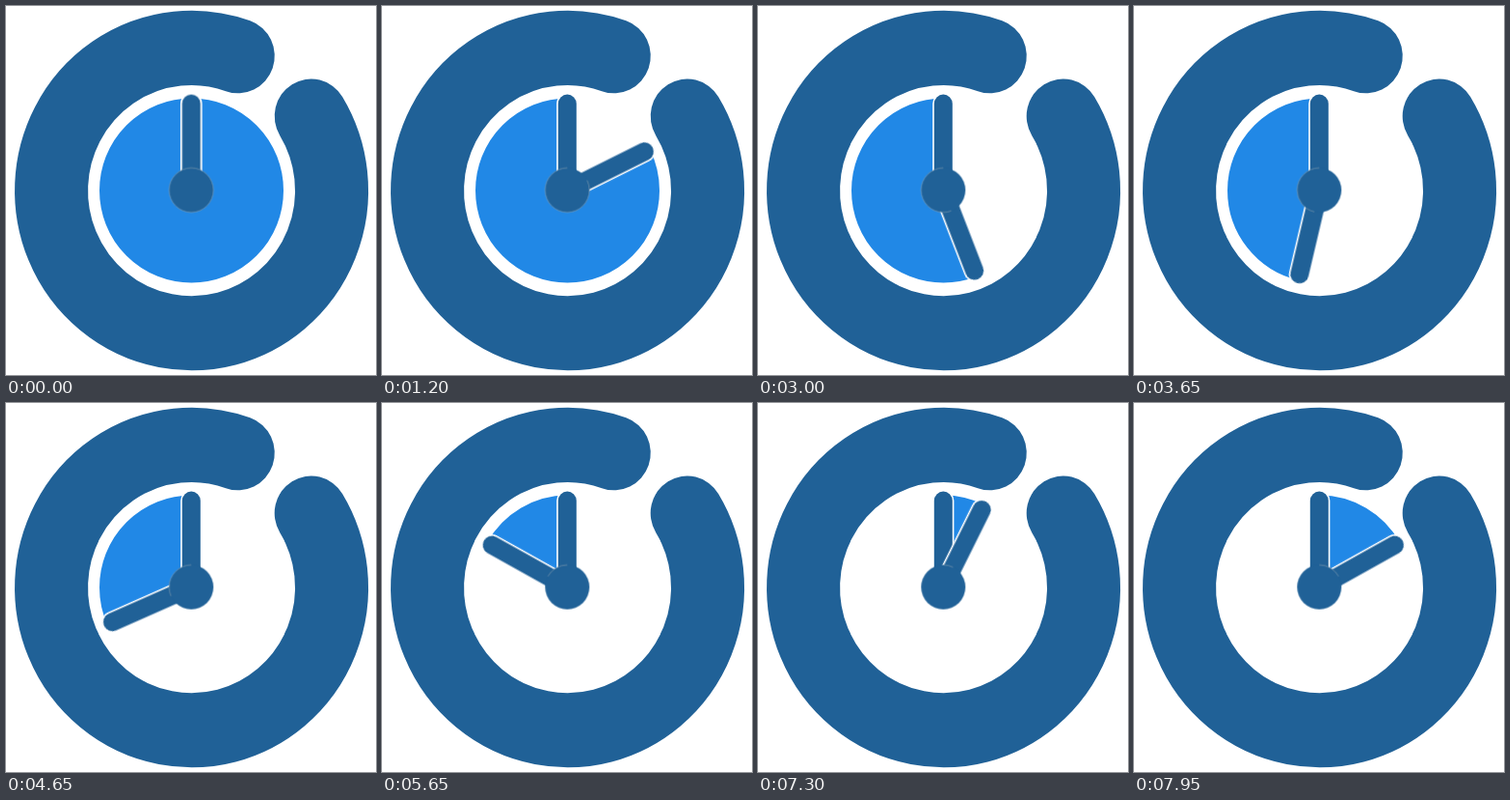
An HTML page without scripts for the animation above (8 s loop, 384 px wide and 382 px high).

```html
<!DOCTYPE html>
<html lang="en">
<head>
<meta charset="utf-8">
<title>Timer</title>
<style>
  html, body { margin: 0; width: 100%; height: 100%; overflow: hidden; background: #fff; }
  svg { display: block; width: 100%; height: 100%; }

  .ring { fill: none; stroke: #206197; stroke-width: 76; stroke-linecap: round; }
  .hand { fill: #206197; stroke: #fff; stroke-width: 3.2; paint-order: stroke; }
  .hub { fill: #206197; }
  .sector, .rim { fill: none; stroke-dasharray: 360 360; }
  .sector { stroke: #2188e6; stroke-width: 95.5; }
  .rim { stroke: #8fa3b3; stroke-width: .8; opacity: .7; }

  /* One turn takes 6.8 s, so 8 s covers 423.53 degrees in 50 ms ticks. */
  .turn, .sector, .rim { animation: 8s steps(160) -8ms infinite; }
  .turn { animation-name: turn; }
  .sector, .rim { animation-name: sweep; }
  @keyframes turn { to { transform: rotate(423.53deg); } }
  /* The dash empties over the first turn, then fills again. */
  @keyframes sweep { from { stroke-dashoffset: 0; } to { stroke-dashoffset: -423.53; } }
</style>
</head>
<body>
<svg viewBox="0 0 384 382">
  <defs>
    <rect id="hand" x="-9.5" y="-99" width="19" height="99" rx="9.5"/>
  </defs>
  <g transform="translate(192.5 191)">
    <path class="ring" transform="scale(1 1.015)" d="M124.2-75.8A145.5 145.5 0 1 1 48.3-137.2"/>
    <circle class="sector" r="47.75" pathLength="360" transform="rotate(-90)"/>
  </g>
  <g transform="translate(192.3 190.6)">
    <use class="hand" href="#hand"/>
    <g class="turn"><use class="hand" href="#hand"/></g>
    <circle class="hub" r="23"/>
    <circle class="rim" r="23" pathLength="360" transform="rotate(-90)"/>
  </g>
</svg>
</body>
</html>
```
